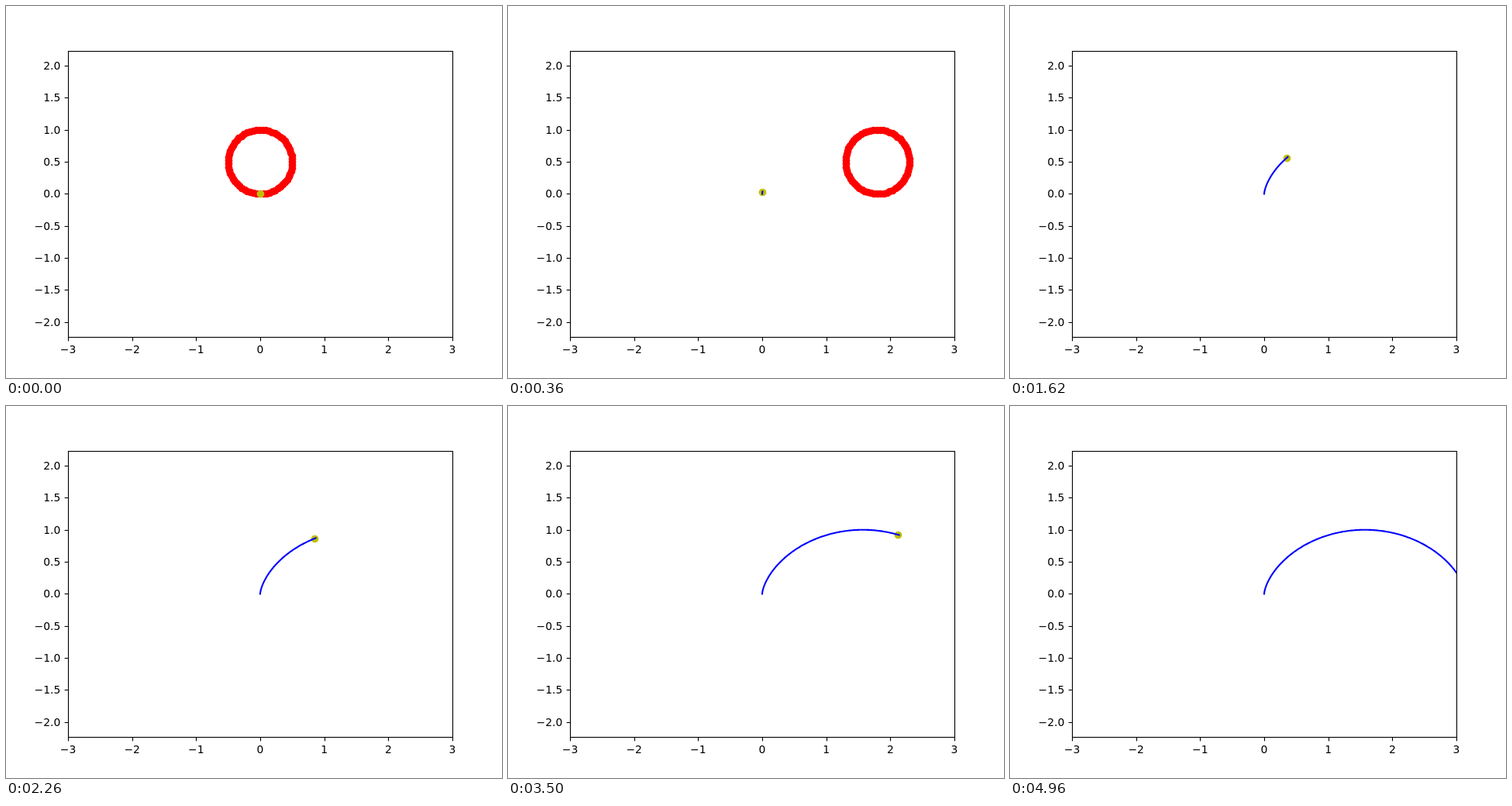
An HTML page that plays this animation: 640 by 480 pixels, repeating every 5.88 s.

```html
<!DOCTYPE html>
<html lang="en">
<head>
<meta charset="utf-8">
<title>Rolling circle and cycloid</title>
<style>
  html, body { margin: 0; width: 100%; height: 100%; overflow: hidden; background: #fff; }
  svg { display: block; width: 640px; height: 480px; }
  text { font: 13.889px "DejaVu Sans", sans-serif; }
  .axes { fill: none; stroke: #000; stroke-width: 1.111; }
  .trail { fill: none; stroke: #00f; stroke-width: 2.083; stroke-linecap: square; stroke-linejoin: round; }
</style>
</head>
<body>
<svg viewBox="0 0 640 480">
  <clipPath id="plot"><rect x="80" y="58" width="496" height="369"/></clipPath>
  <g clip-path="url(#plot)">
    <g id="wheel" fill="#f00"></g>
    <circle id="pen" r="4.86" fill="#bfbf00"/>
    <path id="trail" class="trail"/>
  </g>
  <g id="axes" class="axes"><rect x="80.5" y="58.5" width="496" height="369"/></g>
  <g id="labels"></g>
</svg>
<script>
const STEP = 20, LOOP = 5880;
const RADIUS = 0.5, TURN = 0.02128, ROLL = 0.1;
const UNIT = 496 / 6;

const $ = id => document.getElementById(id);
const px = x => 328 + x * UNIT;
const py = y => 242.4 - y * UNIT;
const snap = v => Math.floor(v + 0.5) + 0.5;

function add(parent, tag, attrs, text = "") {
  const el = document.createElementNS("http://www.w3.org/2000/svg", tag);
  for (const key in attrs) el.setAttribute(key, attrs[key]);
  el.textContent = text;
  parent.append(el);
  return el;
}

function place(dot, [x, y]) {
  dot.setAttribute("cx", snap(px(x)));
  dot.setAttribute("cy", snap(py(y)));
}

const label = (v, digits) => (v < 0 ? "\u2212" : "") + Math.abs(v).toFixed(digits);

function drawAxes() {
  const axes = $("axes"), labels = $("labels");
  for (let v = -3; v <= 3; v++) {
    const x = px(v);
    add(axes, "path", { d: `M${snap(x)} 427.5V432.4` });
    add(labels, "text", { x, y: 448, "text-anchor": "middle" }, label(v, 0));
  }
  for (let v = -2; v <= 2; v += 0.5) {
    const y = py(v);
    add(axes, "path", { d: `M80.5 ${snap(y)}H75.6` });
    add(labels, "text", { x: 70.28, y: Math.round(y + 4.9), "text-anchor": "end" }, label(v, 1));
  }
}

const cycloid = a => [RADIUS * (a - Math.sin(a)), RADIUS * (1 - Math.cos(a))];

const rim = [];
for (let a = 0; a < 2 * Math.PI; a += 0.1) {
  rim.push({ a, dot: add($("wheel"), "circle", { r: 4.86 }) });
}

function draw(n) {
  for (const { a, dot } of rim) {
    place(dot, [n * ROLL + RADIUS * Math.cos(a), RADIUS + RADIUS * Math.sin(a)]);
  }
  // the pen lags one step behind the tip of its trail
  place($("pen"), cycloid(Math.max(0, n - 1) * TURN));
  let d = "";
  for (let i = 0; i <= n; i++) {
    const [x, y] = cycloid(i * TURN);
    d += `${i ? "L" : "M"}${px(x).toFixed(3)} ${py(y).toFixed(3)}`;
  }
  $("trail").setAttribute("d", d);
}

const start = performance.now();
let shown = -1;

function tick() {
  const n = Math.floor(((performance.now() - start) % LOOP) / STEP);
  if (n !== shown) draw(shown = n);
  requestAnimationFrame(tick);
}

drawAxes();
tick();
</script>
</body>
</html>
```
